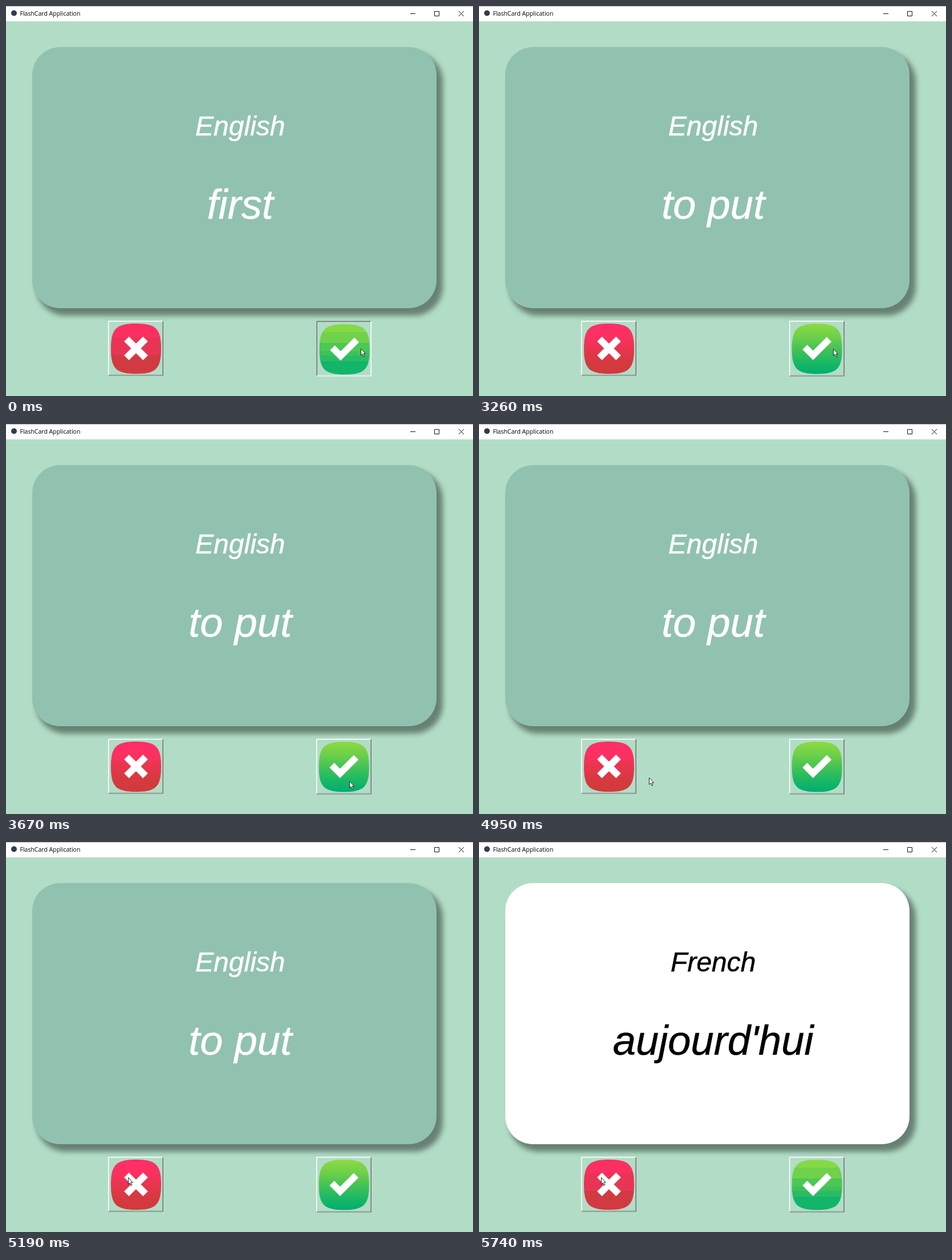
An HTML page that plays this animation: 819x684 px, repeating every 8 s.

```html
<!DOCTYPE html>
<html lang="en">
<head>
<meta charset="utf-8">
<title>FlashCard Application</title>
<style>
  html, body { margin: 0; width: 100%; height: 100%; overflow: hidden; background: #b1ddc6; }
  #stage { position: relative; width: 819px; height: 684px; overflow: hidden; }
  #card {
    position: absolute; left: 46px; top: 72px; width: 709px; height: 458px;
    border-radius: 49px; box-shadow: 9px 11px 10px 2px rgba(0, 0, 0, .42);
  }
  svg { position: absolute; left: 0; top: 0; }
  .word { font-family: "Liberation Sans", Arial, sans-serif; font-style: italic; text-anchor: middle; stroke-width: .5; }
  .bar { font: 10.5px "Open Sans", "Noto Sans", sans-serif; }
</style>
</head>
<body>
<div id="stage">
  <div id="card"></div>
  <svg width="819" height="684" viewBox="0 0 819 684">
    <defs id="defs"></defs>
    <rect width="819" height="27" fill="#fff"/>
    <rect width="819" height="1" fill="#b4b4b4"/>
    <circle cx="14" cy="12.5" r="5" fill="#2f3d4c"/>
    <text class="bar" x="24.5" y="17">FlashCard Application</text>
    <path d="M709 13.5h9M751.5 9.5h8v8h-8zM794 9l9 9M803 9l-9 9" fill="none" stroke="#111"/>

    <g id="text">
      <text id="lang" class="word" x="410.8" y="226.5" font-size="48"></text>
      <text id="word" class="word" x="410.7" y="373" font-size="72.4"></text>
    </g>

    <g id="no" transform="translate(179 552)">
      <path class="tl"/><path class="br"/><path class="tl2"/><path class="br2"/>
      <g class="icon">
        <path class="tile"/>
        <path d="M-23.5 0H23.5M0 -23.5V23.5" transform="translate(44 43.5) rotate(45)" stroke="#fff" stroke-width="12"/>
      </g>
    </g>
    <g id="yes" transform="translate(544 552)">
      <path class="tl"/><path class="br"/><path class="tl2"/><path class="br2"/>
      <g class="icon">
        <path class="tile"/>
        <path d="M18.6 45.2l8.3 -8.3 10.3 10.3 24 -24 8.3 8.3 -32.3 32.3z" fill="#fff"/>
      </g>
    </g>

    <path id="cursor" d="M.5 .5V12.2L3 9.8 5 14.4 7 13.5 5 9.1H8.4Z" fill="#fff" stroke="#111" stroke-width=".9"/>
  </svg>
</div>
<script>
const LOOP = 8000;
const $ = id => document.getElementById(id);

// time, language, word, pressed button
const scenes = [
  [0, "English", "first", "yes"],
  [270, "French", "mettre", ""],
  [3260, "English", "to put", ""],
  [5470, "English", "to put", "no"],
  [5740, "French", "aujourd'hui", ""]
];

// time, x, y of the pointer tip
const moves = [
  [0, 622, 600.5], [3260, 621, 601], [3400, 618, 607], [3520, 614, 614.5],
  [3670, 602, 626], [3790, 580, 645], [3910, 556, 660], [4030, 537, 670],
  [4150, 528, 674], [4950, 298, 620], [5070, 234, 595], [5190, 214, 588]
];

// tile colours: smooth stops, then flat bands as [end, colour]
const tiles = {
  no: {
    smooth: ["#ff2e69", "#fd3062", "#e9354f", "#d6393f", "#d03b3c"],
    bands: [[.27, "#fb2f62"], [.62, "#e93555"], [1, "#d23a41"]]
  },
  yes: {
    smooth: ["#8cdb40", "#6fd04a", "#45c355", "#1cb965", "#00ae6e"],
    bands: [[.16, "#86d945"], [.37, "#6fd24a"], [.53, "#4dc853"],
            [.62, "#3bc25b"], [.74, "#2bbc63"], [1, "#12b56a"]]
  }
};

function gradient(id, stops) {
  const body = stops.map(([at, c]) => `<stop offset="${at}" stop-color="${c}"/>`).join("");
  return `<linearGradient id="${id}" x1="0" y1="0" x2="0" y2="1">${body}</linearGradient>`;
}

let defs = "";
for (const [id, { smooth, bands }] of Object.entries(tiles)) {
  defs += gradient(id + "-smooth", smooth.map((c, i) => [i / (smooth.length - 1), c]));
  defs += gradient(id + "-bands", bands.flatMap(([end, c], i) => [[i ? bands[i - 1][0] : 0, c], [end, c]]));
}
$("defs").innerHTML = defs;

const corner = (w, h, i) => ({
  tl: `M${i} ${h - i}V${i}H${w - i}`,
  br: `M${i} ${h - i}H${w - i}V${i}`
});
const part = (id, name) => $(id).querySelector("." + name);

for (const id of ["no", "yes"]) {
  const h = id === "no" ? 96.5 : 97.5;
  const outer = corner(97, h, .5), inner = corner(97, h, 1.5);
  part(id, "tl").setAttribute("d", outer.tl);
  part(id, "br").setAttribute("d", outer.br);
  part(id, "tl2").setAttribute("d", inner.tl);
  part(id, "br2").setAttribute("d", inner.br);
  for (const name of ["tl", "br", "tl2", "br2"]) part(id, name).setAttribute("fill", "none");
  part(id, "tile").setAttribute("d", "M0 44C0 9 9 0 44 0S88 9 88 44 79 88 44 88 0 79 0 44z");
}

function drawButton(id, pressed, flat) {
  const edges = pressed
    ? { tl: "#a0a0a0", tl2: "#707070", br: "#fff", br2: "#e6ebe8" }
    : { tl: "#fff", tl2: "#e6ebe8", br: "#707070", br2: "#a0a0a0" };
  for (const name in edges) part(id, name).setAttribute("stroke", edges[name]);
  const shift = pressed ? 1 : 0;
  const x = (id === "no" ? 5 : 4.7) + shift;
  const y = (id === "no" ? 5 : 5.3) + shift;
  part(id, "icon").setAttribute("transform", `translate(${x} ${y})`);
  part(id, "tile").setAttribute("fill", `url(#${id}-${flat ? "bands" : "smooth"})`);
}

const current = (table, t) => table.findLast(row => row[0] <= t);

function draw(t) {
  const [start, lang, word, pressed] = current(scenes, t);
  const front = lang === "French";
  const ink = front ? "#000" : "#fff";
  $("card").style.background = front ? "#fff" : "#91c2af";
  $("text").setAttribute("fill", ink);
  $("text").setAttribute("stroke", ink);
  $("lang").textContent = lang;
  $("word").textContent = word;
  const flat = front || start === 0;
  drawButton("no", pressed === "no", flat);
  drawButton("yes", pressed === "yes", flat);
  const [, x, y] = current(moves, t);
  $("cursor").setAttribute("transform", `translate(${x} ${y})`);
}

function tick() {
  draw(performance.now() % LOOP);
  requestAnimationFrame(tick);
}
tick();
</script>
</body>
</html>
```
